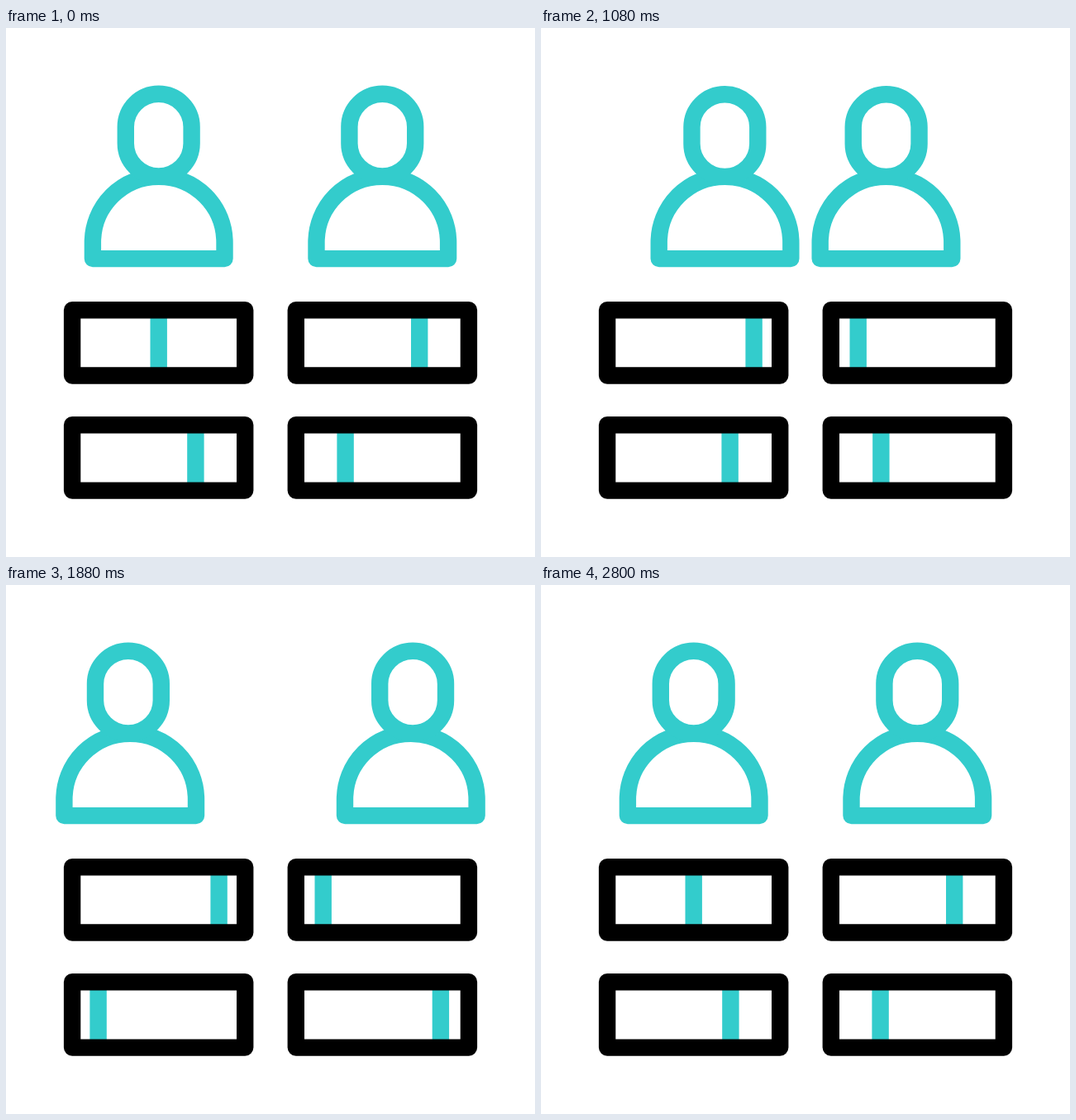
Write an HTML page that moves like this. It is 640x640 px and loops after 3 s.

```html
<!DOCTYPE html>
<html lang="en">
<head>
<meta charset="utf-8">
<title>Two people and sliders</title>
<style>
  html, body { margin: 0; width: 100%; height: 100%; overflow: hidden; background: #fff; }
  svg { display: block; width: 100%; height: 100%; }
  .line, .frame { stroke-width: 20.4; stroke-linejoin: round; }
  .line { fill: #fff; stroke: #3cc; }
  .frame { fill: none; stroke: #000; }
  .bar { fill: #3cc; }
</style>
</head>
<body>
<svg viewBox="0 0 640 640">
  <defs>
    <g id="person">
      <path id="body" class="line" d="M104.9 279.1V259.5a79.8 79.8 0 0 1 159.6 0V279.1Z"/>
      <rect id="head" class="line" x="144.8" y="79.8" width="79.8" height="99.7" rx="39.9"/>
    </g>
    <rect id="frame" class="frame" width="209.1" height="79.3"/>
    <rect id="bar" class="bar" x="-10.2" width="20.4" height="79.3"/>
  </defs>
  <use href="#person"/>
  <use href="#person" transform="matrix(-1 0 0 1 640 0)"/>
  <g transform="translate(0 341.2)">
    <use id="topLeft" href="#bar"/>
    <use id="topRight" href="#bar"/>
    <use href="#frame" x="80.1"/>
    <use href="#frame" x="350.8"/>
  </g>
  <g transform="translate(0 480.3)">
    <use id="lowLeft" href="#bar"/>
    <use id="lowRight" href="#bar"/>
    <use href="#frame" x="80.1"/>
    <use href="#frame" x="350.8"/>
  </g>
</svg>
<script>
const LOOP = 3000, STEP = 40;

const clamp = u => Math.min(1, Math.max(0, u));
const smooth = u => u * u * (3 - 2 * u);
const mix = (from, to, u) => from + (to - from) * u;

// Eased progress from 0 to 1; a power below 1 makes it run ahead.
const glide = (t, start, end, power = 1) =>
  smooth(clamp((t - start) / (end - start)) ** power);

// Rises to 1 at the peak and returns to 0.
const hump = (t, start, end, peak = (start + end) / 2) =>
  glide(t, start, peak) - glide(t, peak, end);

function move(id, x, y = 0) {
  document.getElementById(id).setAttribute('transform', `translate(${x} ${y})`);
}

function draw(t) {
  const meet = glide(t, 80, 920);
  const part = glide(t, 1040, 1880);
  const home = glide(t, 2200, 2800);
  const lowHome = glide(t, 2200, 2800, 0.92);

  const nodIn = hump(t, 80, 920);
  const nodOut = hump(t, 1040, 1880);
  const hop = hump(t, 2200, 2800, 2520);

  const near = meet - part, far = part - home;
  const x = 38.3 * near - 34.5 * far;
  const y = -16.3 * hop;
  const lean = 16.7 * nodIn - 5.8 * nodOut - 2.3 * far - 2.6 * hop;
  const dip = 15.4 * (nodIn + nodOut) - 1.6 * hop;

  move('body', x, y);
  move('head', x + lean, y + dip);
  move('topLeft', mix(184.7, 257.6, meet - home));
  move('topRight', mix(500.2, 383.7, meet - home));
  move('lowLeft', mix(229.4, 111.6, part - lowHome));
  move('lowRight', mix(410.6, 525.9, part - lowHome));
}

let origin;
function tick(now) {
  origin ??= now;
  draw(Math.floor(((now - origin) % LOOP) / STEP) * STEP);
  requestAnimationFrame(tick);
}
draw(0);
requestAnimationFrame(tick);
</script>
</body>
</html>
```
